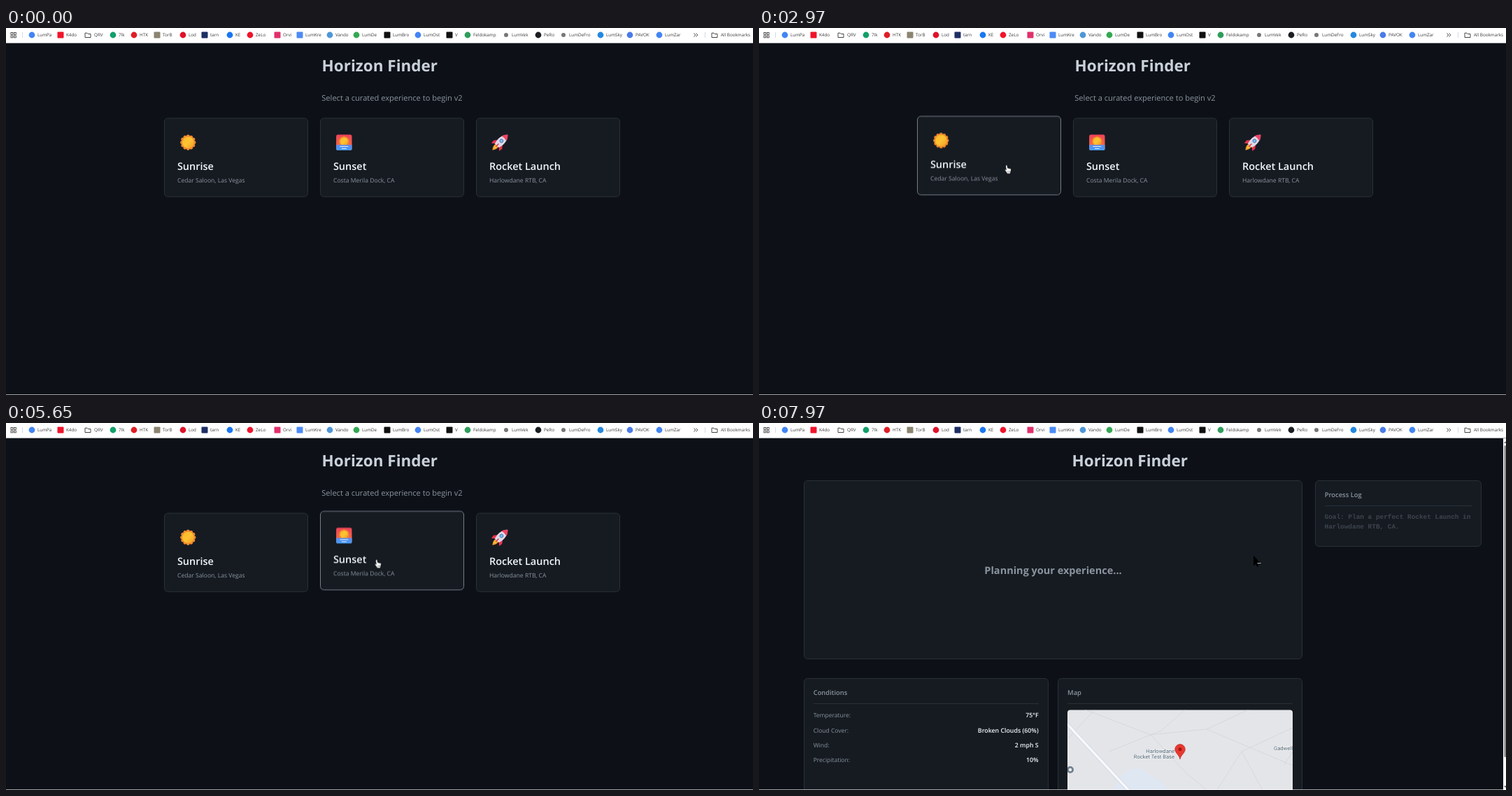
These frames come from a looping animation (1068x525 px, 8000 ms). An HTML page:

```html
<!DOCTYPE html>
<html lang="en">
<head>
<meta charset="utf-8">
<title>Horizon Finder</title>
<style>
  html, body { margin: 0; width: 100%; height: 100%; overflow: hidden; background: #0d1117; }
  svg { display: block; width: 1068px; height: 525px; }
  text { font-family: "Open Sans", "Noto Sans", sans-serif; text-rendering: geometricPrecision; white-space: pre; }
  .mono { font-family: "Liberation Mono", monospace; }
  .map { font-family: Roboto, sans-serif; paint-order: stroke; stroke: #f4f5f7; stroke-width: 1.4px; }
</style>
</head>
<body>
<svg id="stage" viewBox="0 0 1068 525" xmlns="http://www.w3.org/2000/svg">
  <defs>
    <linearGradient id="gold" x1="0" y1="0" x2="1" y2="1">
      <stop offset="0" stop-color="#f9b52c"/><stop offset=".5" stop-color="#fcc433"/><stop offset="1" stop-color="#f39a28"/>
    </linearGradient>
    <linearGradient id="dusk" x1="0" y1="0" x2="0" y2="1">
      <stop offset="0" stop-color="#ee4058"/><stop offset="1" stop-color="#fb7a45"/>
    </linearGradient>
    <linearGradient id="sea" x1="0" y1="0" x2="0" y2="1">
      <stop offset="0" stop-color="#5b8df0"/><stop offset="1" stop-color="#3f9df5"/>
    </linearGradient>
    <clipPath id="tile"><rect x="-11.2" y="-11.2" width="22.4" height="22.4" rx="2.5"/></clipPath>
    <clipPath id="mapBox"><rect x="441" y="410.5" width="322" height="130" rx="4"/></clipPath>
  </defs>
</svg>
<script>
const LOOP = 8000;
const GREY = "#8b949e", LIGHT = "#f0f6fc", EDGE = "#2a3037", EDGE_ON = "#757d87", PANEL = "#161b22";
const stage = document.getElementById("stage");

const label = (x, y, size, str, fill, weight = 400, anchor = "start", cls = "") =>
  `<text x="${x}" y="${y}" font-size="${size}" fill="${fill}" font-weight="${weight}" text-anchor="${anchor}" class="${cls}">${str}</text>`;
const box = (x, y, w, h, fill, extra = "") =>
  `<rect x="${x}" y="${y}" width="${w}" height="${h}" fill="${fill}" ${extra}/>`;
const dot = (x, y, r, fill) => `<circle cx="${x}" cy="${y}" r="${r}" fill="${fill}"/>`;
const path = (d, fill, extra = "") => `<path d="${d}" fill="${fill}" ${extra}/>`;
const panel = (x, y, w, h) => box(x + .5, y + .5, w - 1, h - 1, PANEL, `rx="5" stroke="${EDGE}"`);
const rule = (x1, x2, y) => box(x1, y, x2 - x1, 1, EDGE);

// Bookmarks bar: icon centre, shape (o circle, s square, f folder), colour, label
const marks = [
  [37, "o", "#4285f4", "LumPa"], [78, "s", "#f0142b", "K4do"], [117, "f", "", "QRV"],
  [153, "o", "#12a06a", "7lk"], [183, "o", "#e01e26", "HTK"], [216, "s", "#8a8470", "TorB"],
  [253, "o", "#e0122a", "Lod"], [284, "s", "#1d2f63", "tarn"], [320, "o", "#1877f2", "KE"],
  [349, "o", "#f0142b", "ZeLo"], [388, "s", "#e1306c", "Orvi"], [420, "s", "#4c8bf5", "LumKre"],
  [463, "o", "#4f96d8", "Vando"], [501, "o", "#34a853", "LumDe"], [545, "s", "#111", "LumBro"],
  [589, "o", "#4285f4", "LumOst"], [634, "s", "#111", "V"], [660, "o", "#2e9e5b", "Feldokamp"],
  [715, "o", "#777", "LumVek"], [761, "o", "#1b1f23", "PeRo"], [797, "o", "#777", "LumDeFro"],
  [850, "o", "#2388e0", "LumSky"], [892, "o", "#4a7be8", "PAVOK"], [934, "o", "#4285f4", "LumZar"]
];
const folder = x => path(`M${x - 4} 7.2h3l1.2 1.3h3.8v5h-8z`, "none", 'stroke="#444"');
const icon = ([x, kind, color]) =>
  kind === "f" ? folder(x)
  : kind === "s" ? box(x - 4.5, 5.5, 9, 9, color, 'rx="1"')
  : dot(x, 10, color === "#777" ? 3 : 4.4, color);

function bar() {
  let out = box(0, 0, 1068, 21.6, "#fff");
  for (const x of [7, 11.5]) for (const y of [6.5, 11])
    out += box(x, y, 2.8, 2.8, "none", 'stroke="#444" stroke-width=".9"');
  out += box(23, 6, 1, 8, "#d3dbe6") + box(999, 6, 1, 8, "#d3dbe6");
  for (const m of marks) out += icon(m) + label(m[0] + (m[1] === "f" ? 9 : 8), 12.3, 6.3, m[3], "#3a3a3a");
  out += path("M983.5 7.5l2.3 2.5-2.3 2.5M986.5 7.5l2.3 2.5-2.3 2.5", "none", 'stroke="#444"');
  return out + folder(1013) + label(1022, 12.3, 6.3, "All Bookmarks", "#3a3a3a");
}

function sun(r) {
  let out = "";
  for (let i = 0; i < 12; i++) {
    const a = i * Math.PI / 6;
    out += dot((Math.cos(a) * r * .78).toFixed(2), (Math.sin(a) * r * .78).toFixed(2), r * .22, "#f08a2c");
  }
  return out + dot(0, 0, r * .84, "#f08a2c") + dot(0, 0, r * .74, "url(#gold)");
}
const sunset = `<g clip-path="url(#tile)">${box(-12, -12, 24, 24, "url(#dusk)")}
  <g transform="translate(0 -1.5)">${sun(7.6)}</g>${box(-12, 3.5, 24, 9, "url(#sea)")}
  ${box(-6, 5.2, 12, 1.1, "#dcecff", 'rx=".5"')}${box(-3.5, 8.3, 7, 1.1, "#dcecff", 'rx=".5"')}</g>`;
const rocket = `<g transform="rotate(45)">
  ${path("M-2.6 6Q-4.5 10 0 15.5Q4.5 10 2.6 6z", "#f9a02e")}${path("M-1.3 6Q-2 9 0 12Q2 9 1.3 6z", "#fcd53f")}
  ${path("M4.4-1L8.6 4.5L8 9.5L3.6 6zM-4.4-1L-8.6 4.5L-8 9.5L-3.6 6z", "#e8344f")}
  ${path("M0-15.5C6.2-10 6.4 0 4 6.5H-4C-6.4 0-6.2-10 0-15.5z", "#dfd9e6")}
  ${path("M0-15.5C2.8-13 4.3-10.6 4.9-8Q0-9.6-4.9-8C-4.3-10.6-2.8-13 0-15.5z", "#ef4363")}
  ${dot(0, -3, 2.8, "#4f7fb8")}${dot(0, -3, 1.8, "#7cc4f5")}${box(-.8, 2.5, 1.6, 6.5, "#e8344f", 'rx=".8"')}</g>`;

const cards = [
  { x: 226, art: sun(11.2), name: "Sunrise", place: "Cedar Saloon, Las Vegas", hover: [[2030, 3200]] },
  { x: 449, art: sunset, name: "Sunset", place: "Costa Merila Dock, CA", hover: [[1155, 1985], [3260, 4300], [5190, 6890]] },
  { x: 672, art: rocket, name: "Rocket Launch", place: "Harlowdane RTB, CA", hover: [[580, 1105], [4355, 5120], [6960, null]] }
];
const card = c => `<g class="card">
  <rect class="edge" x="${c.x + .5}" y="129" width="205" height="112.4" rx="5" fill="${PANEL}" stroke="${EDGE}"/>
  <g transform="translate(${c.x + 34.3} 163.7)">${c.art}</g>
  ${label(c.x + 18.9, 203, 14.5, c.name, LIGHT, 600)}${label(c.x + 19, 220.8, 8.6, c.place, GREY)}</g>`;

const heading = x => label(x, 61.8, 22.5, "Horizon Finder", "#c9d1d9", 700, "middle");
const home = `<g id="home">${heading(534.3)}
  ${label(552, 103.6, 11.1, "Select a curated experience to begin v2", GREY, 400, "middle")}
  ${cards.map(card).join("")}</g>`;

const facts = [["Temperature:", "75°F"], ["Cloud Cover:", "Broken Clouds (60%)"], ["Wind:", "2 mph S"], ["Precipitation:", "10%"]];
const thin = 'stroke="#d3d5da" stroke-width=".8"';
const map = `<g clip-path="url(#mapBox)">${box(441, 410, 322, 120, "#e4e5e9")}
  ${path("M508 525Q514 503 530 496Q548 490 556 502Q576 512 586 525z", "#dfe7f3")}
  ${path("M441 452L480 410M466 410L560 446L640 438L763 490M500 470L575 440L610 410M640 438L700 410M655 525L690 470L763 436M560 446L610 500L640 525M690 470L720 525M763 470L750 490", "none", thin)}
  ${path("M438 428L530 527", "none", 'stroke="#cdd3e0" stroke-width="5"')}
  ${path("M438 428L530 527", "none", 'stroke="#f7f8fb" stroke-width="3.6"')}
  ${dot(445, 496, 5, "#73818c")}${dot(445, 496, 2.2, "#eef0f2")}
  ${label(594, 471.8, 7.6, "Harlowdane", "#4d6470", 400, "end", "map")}
  ${label(594, 479.8, 7.6, "Rocket Test Base", "#4d6470", 400, "end", "map")}
  ${label(736, 467.6, 7.6, "Gadwell", "#4d6470", 400, "start", "map")}
  ${path("M602 481C601 475 594.7 472 594.7 466.8A7.3 7.3 0 0 1 609.3 466.8C609.3 472 603 475 602 481z", "#e8382f", 'stroke="#b92b20" stroke-width=".7"')}
  ${dot(602, 466.8, 2.5, "#a3180f")}</g>`;

const plan = `<g id="plan">${heading(530.3)}
  ${panel(64, 82, 713, 256)}${label(420.5, 216.3, 14.5, "Planning your experience...", GREY, 700, "middle")}
  ${panel(795, 82, 238, 95)}${label(808.7, 106.3, 9.4, "Process Log", GREY, 600)}${rule(809, 1019, 118)}
  <g id="log">${label(808.5, 136.8, 9.42, "Goal: Plan a perfect Rocket Launch in", GREY, 700, "start", "mono")}
  ${label(808.5, 150.8, 9.42, "Harlowdane RTB, CA.", GREY, 700, "start", "mono")}</g>
  ${panel(64, 365, 350, 200)}${label(77.7, 389.3, 9.4, "Conditions", GREY, 600)}${rule(78, 400, 401)}
  ${facts.map(([k, v], i) => label(77.7, 421.2 + i * 21.3, 8.5, k, GREY) +
    label(399.7, 421.2 + i * 21.3, 8.8, v, LIGHT, 600, "end")).join("")}
  ${panel(427, 365, 350, 200)}${label(441, 389.3, 9.4, "Map", GREY, 600)}${rule(441, 763, 401)}${map}
  ${box(1064, 22, 4, 503, "#fafafa")}${box(1065.3, 32, 3, 446, "#8b8b8b", 'rx="1.5"')}
  ${path("M1065 29l2-3 2 3zM1065 519l2 3 2-3z", "#777")}
  ${path("M707 189.5V204.5L710.3 201.6L712.4 206L714.4 205L712.5 200.8H717z", "#000")}
  ${box(712.5, 200, 5, 1, "#b9bcc0")}</g>`;

const hand = `<g id="hand">${path("M-2.6-6.2C-1.4-6.6-.9-5.8-.8-5L-.5-2.3L3.2-1.5C4.3-1.2 4.6-.5 4.5.6L3.9 3.6L3.3 6H-1.6L-2 4.4L-4.6.9C-5-.2-3.7-.8-3 .1L-2.7.5L-3.5-5C-3.5-5.6-3.2-6-2.6-6.2z", "#fff", 'stroke="#0a0c10" stroke-width=".9"')}
  ${path("M-.3 1.8v2.4M1.3 1.8v2.4M2.8 1.8v2.2", "none", 'stroke="#333" stroke-width=".5"')}</g>`;

stage.insertAdjacentHTML("beforeend",
  box(0, 0, 1068, 525, "#0d1117") + home + plan + bar() + hand + box(0, 524.4, 1068, 1, "#fff"));

const start = document.timeline.currentTime || 0;
function run(el, frames) {
  const a = el.animate(frames.map(([t, style, easing = "linear"]) => ({ offset: t / LOOP, easing, ...style })),
    { duration: LOOP, iterations: Infinity });
  a.startTime = start;
}
const cut = "steps(1, end)";
const show = (el, from, to) => run(el, [
  [0, { opacity: from ? 0 : 1 }, cut], ...(from ? [[from, { opacity: 1 }, cut]] : []),
  ...(to < LOOP ? [[to, { opacity: 0 }, cut]] : []), [LOOP, { opacity: to < LOOP ? 0 : 1 }]]);

// A hovered card rises and its border brightens over 200 ms
function lift(el, spans, down, up) {
  const frames = [[0, down]];
  for (const [on, off] of spans) {
    frames.push([on, down, "ease"], [on + 200, up]);
    if (off) frames.push([off, up, "ease"], [off + 200, down]);
  }
  frames.push([LOOP, frames[frames.length - 1][1]]);
  run(el, frames);
}
document.querySelectorAll(".card").forEach((el, i) => {
  const { hover } = cards[i];
  lift(el, hover, { transform: "translate(0px, 0px)" }, { transform: "translate(0px, -2.7px)" });
  lift(el.querySelector(".edge"), hover, { stroke: EDGE }, { stroke: EDGE_ON });
});

// Pointer path: time, x, y
const way = [
  [0, 1040, 518], [70, 1040, 518], [330, 930, 360], [580, 838, 246], [830, 752, 219], [1000, 699, 214],
  [1180, 637, 213], [1420, 567, 213], [1740, 505, 213], [1985, 449, 213], [2080, 421, 213],
  [2280, 356, 210], [2500, 312, 206], [2760, 312, 206], [3000, 362, 202], [3200, 432, 198],
  [3400, 478, 194], [3600, 486, 193], [3850, 502, 194], [4100, 580, 196], [4300, 657, 197],
  [4360, 682, 197], [4500, 699, 197], [4710, 704, 197], [4980, 703.5, 197.5], [5120, 674, 198],
  [5400, 590, 201], [5780, 502, 202], [5980, 490, 202], [6250, 520, 199], [6600, 604, 197],
  [6810, 638, 197], [6890, 656, 196], [6960, 674, 194], [7130, 698, 192], [7300, 707, 191],
  [7699, 707, 191], [7700, 708, 190.5], [LOOP, 708, 190.5]
];
const handEl = document.getElementById("hand");
run(handEl, way.map(([t, x, y]) => [t, { transform: `translate(${x}px, ${y}px)` }]));
show(handEl, 70, 7900);
show(document.getElementById("home"), 0, 7900);
show(document.getElementById("plan"), 7900, LOOP);
run(document.getElementById("log"), [[0, { opacity: 0 }], [7900, { opacity: 0 }], [7970, { opacity: .34 }], [LOOP, { opacity: .4 }]]);
</script>
</body>
</html>
```
